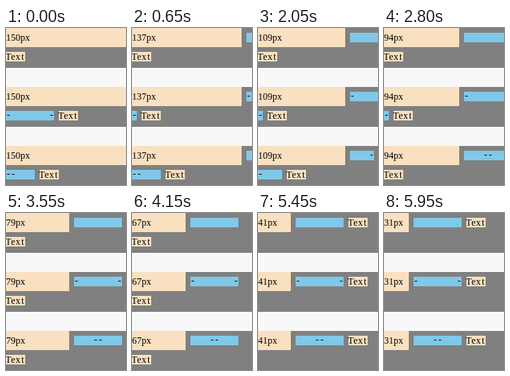
Animation, 150 px wide and 197 px high, one loop 6000 ms. Source, as an HTML page:

```html
<!DOCTYPE html>
<html lang="en">
<head>
<meta charset="utf-8">
<title>Wrapping spaces beside a float</title>
<style>
  html, body { margin: 0; width: 100%; height: 100%; overflow: hidden; background: #f8f8f8; }
  svg { display: block; width: 150px; height: 197px; }
  rect { shape-rendering: crispEdges; }
  text { font: 12px "Liberation Serif", "Noto Serif", serif; text-anchor: middle; white-space: pre; }
</style>
</head>
<body>
<svg id="stage" viewBox="0 0 150 197"></svg>
<script>
const STAGE = 150, CELL = 6, LINE = 24, PITCH = 74, STEP = 50, STEPS = 120;
const GRAY = '#808080', BISQUE = '#f8e0c0', BLUE = '#80c8e8';

// Each row's blue span, split where a line may break.
const ROWS = [
  [' '.repeat(10)],
  ['-' + ' '.repeat(8), '-'],
  [' '.repeat(4), '-', '-' + ' '.repeat(4)]
];

const stage = document.getElementById('stage');

const rect = (x, y, w, h, fill) =>
  `<rect x="${x}" y="${y}" width="${w}" height="${h}" fill="${fill}"/>`;

// Characters sit centred in 6px cells.
const label = (str, x, y) => {
  const xs = [...str].map((_, i) => x + (i + 0.5) * CELL).join(' ');
  return `<text x="${xs}" y="${y}">${str}</text>`;
};

const span = (str, x, top) => {
  if (!str) return '';
  let out = rect(x, top, str.length * CELL, 12, BLUE);
  [...str].forEach((c, i) => {
    if (c === '-') out += label(c, x + i * CELL, top + 9);
  });
  return out;
};

function drawRow(units, top, width) {
  const start = width + CELL;
  let first = '', second = '';
  for (const unit of units) {
    // Trailing spaces hang, so only visible characters need room.
    const ink = unit.trimEnd().length;
    const end = start + (first.length + ink) * CELL;
    if (!second && (!ink || end <= STAGE)) first += unit;
    else second += unit;
  }

  const line1 = top + 6, line2 = line1 + LINE;
  let x = start + first.length * CELL + CELL, y = line1;
  if (second || x + 4 * CELL > STAGE) {
    x = second ? (second.length + 1) * CELL : 0;
    y = line2;
  }

  return rect(0, top, STAGE, 50, GRAY) +
    rect(0, top, width, LINE, BISQUE) +
    label(width + 'px', 0, line1 + 10) +
    span(first, start, line1) +
    span(second, 0, line2) +
    rect(x, y, 4 * CELL, 12, BISQUE) +
    label('Text', x, y + 10);
}

let shown = -1;
const begin = performance.now();

function render(now) {
  const step = Math.floor(Math.max(0, now - begin) / STEP) % STEPS;
  if (step !== shown) {
    shown = step;
    stage.innerHTML = ROWS.map((units, i) => drawRow(units, i * PITCH, STAGE - step)).join('');
  }
  requestAnimationFrame(render);
}
render(begin);
</script>
</body>
</html>
```
